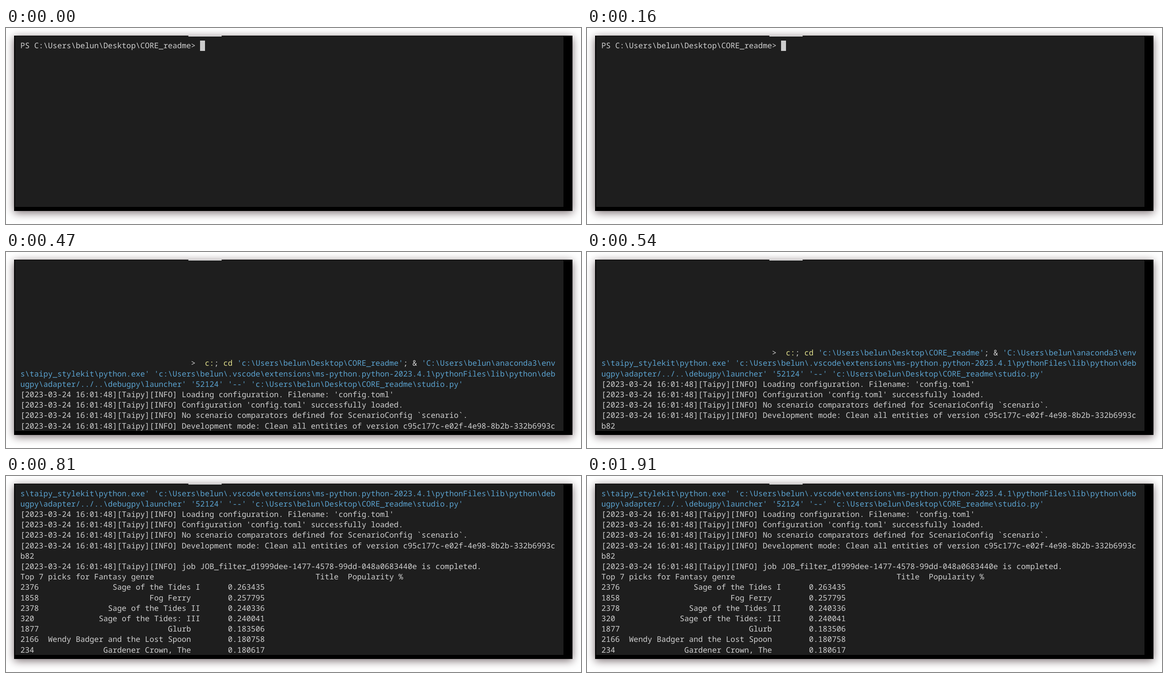
An HTML page for the animation above (2.65 s loop, 1280 by 436 pixels).

```html
<!DOCTYPE html>
<html lang="en">
<head>
<meta charset="utf-8">
<title>Terminal run</title>
<style>
  html, body { margin: 0; width: 100%; height: 100%; overflow: hidden; background: #fff; }
  body { position: relative; }
  div, pre { position: absolute; margin: 0; }
  .window { left: 18px; top: 17px; width: 1243px; height: 390px; background: #000;
    box-shadow: 0 4px 18px rgba(30, 10, 15, .6); }
  .panel { left: 20px; top: 18px; width: 1221px; height: 380px; background: #1e1e1e; }
  .tab { left: 406px; top: 17px; width: 74px; height: 2px; background: #d8d8d8; }
  .view { left: 32px; top: 27px; width: 1205px; height: 371px; overflow: hidden; }
  pre { left: 0; top: .6px; color: #d0d0d0; white-space: pre;
    font: 17.12px/23.2px "Noto Sans Mono", "DejaVu Sans Mono", monospace;
    text-rendering: geometricPrecision; font-variant-ligatures: none; }
  b, i { font-weight: inherit; font-style: normal; }
  b { color: #5ba3d0; }
  i { color: #e0df8c; }
  .cursor { background: #ccc; }
</style>
</head>
<body>
<div class="window"></div>
<div class="panel"></div>
<div class="tab"></div>
<div class="view">
<pre id="prompt">PS C:\Users\belun\Desktop\CORE_readme&gt; <span class="cursor"> </span></pre>
<pre id="log">
                                     &gt;  <i>c:</i>; <i>cd</i> <b>'c:\Users\belun\Desktop\CORE_readme'</b>; &amp; <b>'C:\Users\belun\anaconda3\env
s\taipy_stylekit\python.exe' 'c:\Users\belun\.vscode\extensions\ms-python.python-2023.4.1\pythonFiles\lib\python\deb
ugpy\adapter/../..\debugpy\launcher' '52124' '--' 'c:\Users\belun\Desktop\CORE_readme\studio.py'</b>
[2023-03-24 16:01:48][Taipy][INFO] Loading configuration. Filename: 'config.toml'
[2023-03-24 16:01:48][Taipy][INFO] Configuration 'config.toml' successfully loaded.
[2023-03-24 16:01:48][Taipy][INFO] No scenario comparators defined for ScenarioConfig `scenario`.
[2023-03-24 16:01:48][Taipy][INFO] Development mode: Clean all entities of version c95c177c-e02f-4e98-8b2b-332b6993c
b82
[2023-03-24 16:01:48][Taipy][INFO] job JOB_filter_d1999dee-1477-4578-99dd-048a0683440e is completed.
Top 7 picks for Fantasy genre                                   Title  Popularity %
2376                Sage of the Tides I      0.263435
1858                        Fog Ferry        0.257795
2378               Sage of the Tides II      0.240336
320              Sage of the Tides: III      0.240041
1877                            Glurb        0.183506
2166  Wendy Badger and the Lost Spoon        0.180758
234               Gardener Crown, The        0.180617
</pre>
</div>
<script>
  const LOOP = 2650, ROWS = 16, LINE = 23.2;
  // [start in ms, lines printed so far], latest first
  const steps = [[810, 17], [540, 8], [470, 7], [270, 3], [0, 0]];
  const prompt = document.getElementById("prompt");
  const log = document.getElementById("log");
  const origin = performance.now();

  function draw() {
    const t = (performance.now() - origin) % LOOP;
    const [, printed] = steps.find(([start]) => t >= start);
    prompt.style.visibility = printed ? "hidden" : "visible";
    // New lines enter at the bottom row and push the rest up.
    log.style.top = (ROWS - printed) * LINE + .6 + "px";
    requestAnimationFrame(draw);
  }
  draw();
</script>
</body>
</html>
```
